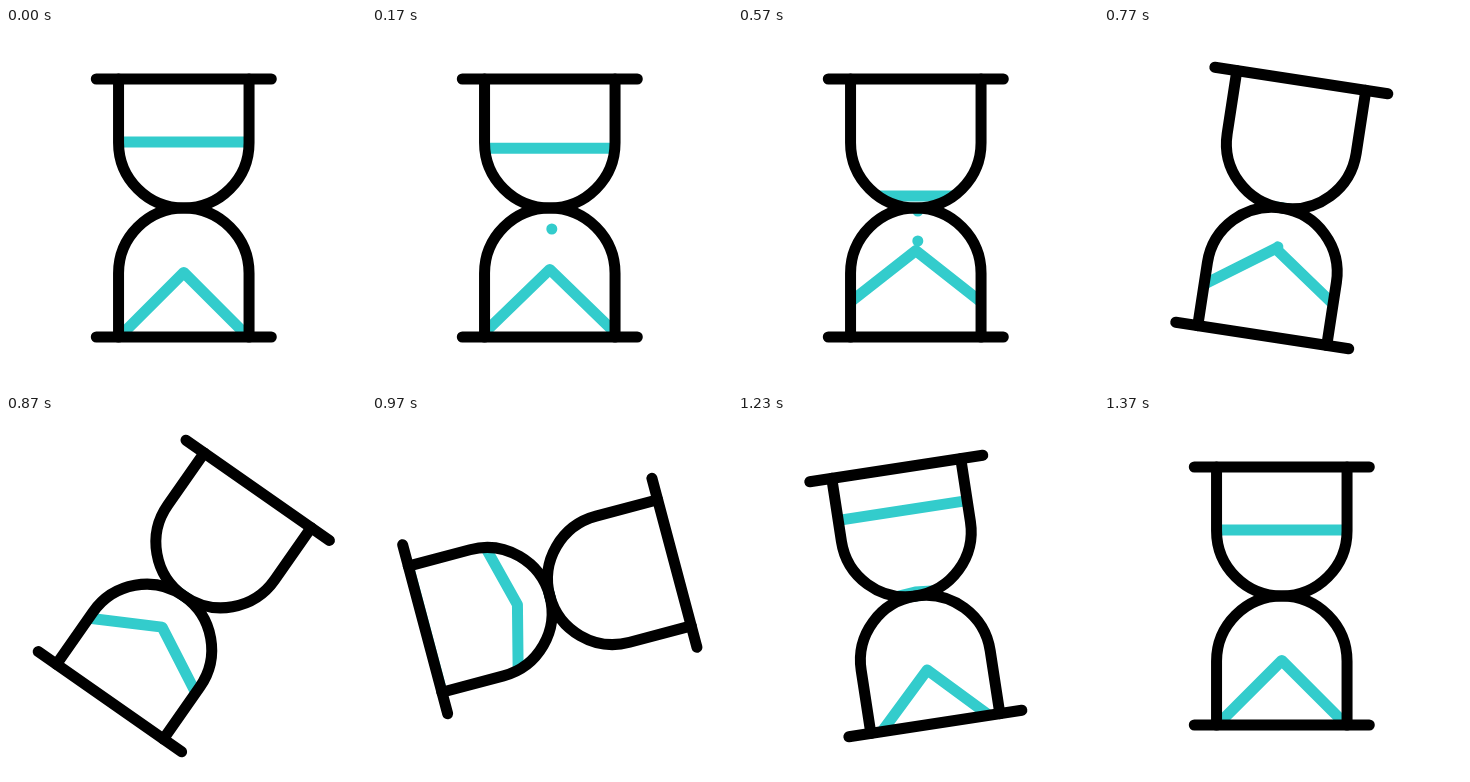
An HTML page for the animation above (2 s loop, 360 px wide and 360 px high).

```html
<!DOCTYPE html>
<html lang="en">
<head>
<meta charset="utf-8">
<title>Hourglass</title>
<style>
  html, body { margin: 0; width: 100%; height: 100%; overflow: hidden; background: #fff; }
  svg { display: block; width: 100vw; height: 100vh; }
  .sand { fill: none; stroke: #33cccc; stroke-width: 11; stroke-linejoin: round; }
  .drop { fill: #33cccc; }
  .glass { fill: none; stroke: #000; stroke-width: 11; stroke-linecap: round; }
</style>
</head>
<body>
<!-- The origin is the neck of the hourglass. -->
<svg viewBox="0 0 360 360">
  <defs>
    <path id="bulb" d="M-65.25-129V-65.25A65.25 65.25 0 0 0 65.25-65.25V-129"/>
    <clipPath id="inside">
      <use href="#bulb"/>
      <use href="#bulb" transform="scale(1 -1)"/>
    </clipPath>
  </defs>
  <g id="body">
    <g clip-path="url(#inside)">
      <path class="sand" id="level"/>
      <path class="sand" id="heap"/>
      <g id="drops"></g>
      <g transform="rotate(180)">
        <path class="sand" id="nextLevel"/>
        <path class="sand" id="nextHeap"/>
      </g>
    </g>
    <g class="glass">
      <use href="#bulb"/>
      <use href="#bulb" transform="scale(1 -1)"/>
      <path d="M-87.5-129H87.5M-87.5 129H87.5"/>
    </g>
  </g>
</svg>
<script>
const LOOP = 2000, FPS = 30, MOVE_END = 41;
const $ = id => document.getElementById(id);
const mix = (a, b, p) => a + (b - a) * p;

// cubic-bezier(.4, 0, .6, 1) between two ticks
function ease(f, from, to) {
  const x = (f - from) / (to - from);
  if (x <= 0) return 0;
  if (x >= 1) return 1;
  const u = x - 0.5;
  let d = u;
  for (let i = 0; i < 5; i++) d -= (0.9 * d + 0.4 * d ** 3 - u) / (0.9 + 1.2 * d * d);
  return 0.5 + 1.5 * d - 2 * d ** 3;
}

// smooth curve through [tick, value] points, at rest at both ends
function track(points, f) {
  const last = points.length - 1;
  if (f <= points[0][0]) return points[0][1];
  if (f >= points[last][0]) return points[last][1];
  const i = points.findIndex(p => p[0] > f) - 1;
  const slope = k => k === 0 || k === last ? 0 :
    (points[k + 1][1] - points[k - 1][1]) / (points[k + 1][0] - points[k - 1][0]);
  const [x0, y0] = points[i], [x1, y1] = points[i + 1];
  const w = x1 - x0, s = (f - x0) / w, r = 1 - s;
  return r * r * (1 + 2 * s) * y0 + s * s * (3 - 2 * s) * y1
    + w * s * r * (r * slope(i) - s * slope(i + 1));
}

const APEX = [[20, 41.5], [23, 41], [29, 33.5], [32, 24.7], [37, 4], [40, 0]];
const NEXT_LEVEL = [[30, -129], [32, -123.5], [37, -86.5], [41, -66]];
const NEXT_APEX = [[29, 131], [32, 112], [37, 74.8], [41, 64.5]];

const DROP_GAP = 30, DROP_SPEED = 6, DROP_COUNT = 4;
const drops = Array.from({ length: DROP_COUNT }, () => {
  const dot = document.createElementNS("http://www.w3.org/2000/svg", "circle");
  dot.setAttribute("class", "drop");
  dot.setAttribute("cx", 2);
  dot.setAttribute("r", 5.5);
  $("drops").append(dot);
  return dot;
});

const setLevel = (id, y) => $(id).setAttribute("d", `M-70 ${y}H70`);

// edge is the height of the heap 60 units from the axis
function setHeap(id, apex, edge) {
  const end = apex + (edge - apex) * 70 / 60;
  $(id).setAttribute("d", `M-70 ${end}L0 ${apex}L70 ${end}`);
}

function draw(ms) {
  let f = Math.floor((ms % LOOP + 3.4) * FPS / 1000);
  if (f >= MOVE_END) f = 0;

  const turn = 180 * ease(f, 20, 40);
  $("body").setAttribute("transform", `translate(177.8 180) rotate(${turn})`);

  const fill = ease(f, 0, 20);
  const apex = f < 20 ? mix(64.5, 41.5, fill) : track(APEX, f);
  const edge = f < 20 ? mix(124.5, 88, fill) : mix(88, -6, ease(f, 20, 40));
  setLevel("level", mix(-66, 0, ease(f, 0, 24)));
  setHeap("heap", apex, edge);

  drops.forEach((dot, i) => {
    const y = (f - 1.5) * DROP_SPEED - i * DROP_GAP;
    dot.setAttribute("cy", y);
    dot.setAttribute("visibility", y > 0 && y <= apex ? "visible" : "hidden");
  });

  const nextApex = track(NEXT_APEX, f);
  setLevel("nextLevel", track(NEXT_LEVEL, f));
  setHeap("nextHeap", nextApex, nextApex + 60);
  const idle = f < 29 ? "hidden" : "visible";
  $("nextLevel").setAttribute("visibility", idle);
  $("nextHeap").setAttribute("visibility", idle);
}

const start = performance.now();
function tick() {
  draw(performance.now() - start);
  requestAnimationFrame(tick);
}
tick();
</script>
</body>
</html>
```
